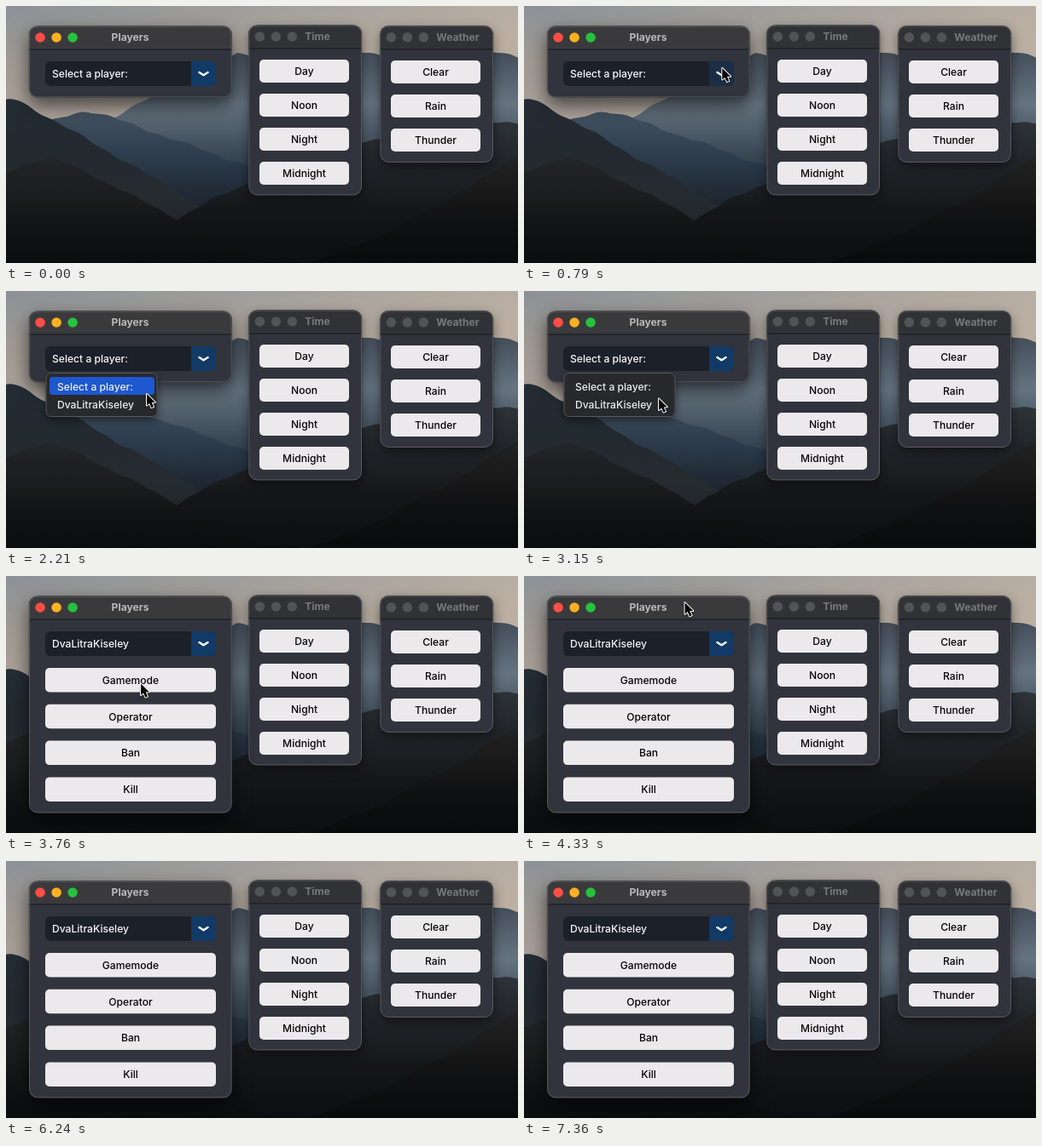
Animation, 600 px wide and 302 px high, one loop 7.39 s. Source, as an HTML page with a canvas:

```html
<!DOCTYPE html>
<html lang="en">
<head>
<meta charset="utf-8">
<title>Control panel</title>
<style>
html, body { margin: 0; width: 100%; height: 100%; overflow: hidden; background: #14171c; }
canvas { display: block; width: 600px; height: 302px; }
</style>
</head>
<body>
<canvas id="stage"></canvas>
<script>
const W = 600, H = 302, LOOP = 7390;
const FONT = 'Inter, "Open Sans", sans-serif';
const PROMPT = 'Select a player:', PLAYER = 'DvaLitraKiseley';
const PRESS = 640, OPEN = 940, LEAVE = 1500, PICK = 3110, CHOSEN = 3300, CLOSED = 3400;

const canvas = document.getElementById('stage');
const dpr = window.devicePixelRatio || 1;
canvas.width = W * dpr;
canvas.height = H * dpr;
const ctx = canvas.getContext('2d');

function box(x, y, w, h, r, fill) {
  ctx.beginPath();
  ctx.roundRect(x, y, w, h, r);
  ctx.fillStyle = fill;
  ctx.fill();
}

function outline(x, y, w, h, r, color) {
  ctx.beginPath();
  ctx.roundRect(x, y, w, h, r);
  ctx.lineWidth = 1;
  ctx.strokeStyle = color;
  ctx.stroke();
}

function shadowed(alpha, blur, dy, paint) {
  ctx.save();
  ctx.shadowColor = `rgba(0,0,0,${alpha})`;
  ctx.shadowBlur = blur * dpr;
  ctx.shadowOffsetY = dy * dpr;
  paint();
  ctx.restore();
}

function text(str, x, y, color, align = 'center', weight = 500, size = 12.1) {
  ctx.font = `${weight} ${size}px ${FONT}`;
  ctx.textAlign = align;
  ctx.fillStyle = color;
  ctx.fillText(str, x, y + 4.5);
}

function shade(c, x0, y0, x1, y1, colors) {
  const g = c.createLinearGradient(x0, y0, x1, y1);
  colors.forEach((col, i) => g.addColorStop(i / (colors.length - 1), col));
  return g;
}

// Fills everything below the height function, with a slightly rough edge
function ridge(c, top, bottom, colors, height) {
  c.beginPath();
  c.moveTo(0, H);
  for (let x = 0; x <= W; x += 3) {
    c.lineTo(x, height(x) + Math.sin(x / 5) * .8 + Math.sin(x / 13 + top) * 1.2);
  }
  c.lineTo(W, H);
  c.fillStyle = shade(c, 0, top, 0, bottom, colors);
  c.fill();
}

function makeLandscape() {
  const layer = document.createElement('canvas');
  layer.width = canvas.width;
  layer.height = canvas.height;
  const c = layer.getContext('2d');
  c.scale(dpr, dpr);
  c.fillStyle = shade(c, 0, 0, 0, 120, ['#8b9197', '#a09a94', '#a9a098']);
  c.fillRect(0, 0, W, H);
  c.fillStyle = shade(c, 0, 0, W, 0, ['rgba(198,183,166,0)', 'rgba(198,183,166,.75)']);
  c.fillRect(0, 0, W, H);

  ridge(c, 55, 235, ['#454f5b', '#667481', '#3a4855', '#1b2128'],
    x => Math.max(60 + 5 * Math.sin(x / 24), 196 - .52 * x));
  ridge(c, 120, 270, ['#465563', '#2f3f50', '#202a35', '#15191e'],
    x => 120 + .36 * Math.hypot(x - 95, 10));
  ridge(c, 105, 215, ['#262e36', '#22292f', '#262b30'],
    x => 105 + .58 * Math.hypot(x - 6, 8));
  ridge(c, 137, 290, ['#2e3338', '#202428', '#15181b', '#101215'],
    x => 137 + 125 * ((W - x) / 420) ** 2);
  ridge(c, 175, 290, ['#232628', '#191b1d', '#0e1012'],
    x => 170 + .52 * Math.hypot(x - 48, 18));
  ridge(c, 175, 300, ['#232324', '#151516', '#0a0b0c'],
    x => 301 - 125 * (Math.max(0, x - 350) / 250) ** 1.3);
  c.fillStyle = shade(c, 0, 225, 0, H, ['rgba(8,10,12,0)', 'rgba(8,10,12,.4)']);
  c.fillRect(0, 225, W, H - 225);
  return layer;
}
const landscape = makeLandscape();

function panel(x, y, w, h, title, titleX, lights, active) {
  const [alpha, blur, dy] = active ? [.6, 22, 9] : [.45, 14, 5];
  shadowed(alpha, blur, dy, () => box(x, y, w, h, 10, '#31343c'));
  box(x, y, w, 27, [10, 10, 0, 0], active ? '#3a3a3c' : '#313236');
  ctx.fillStyle = '#17181b';
  ctx.fillRect(x, y + 27, w, 1);
  outline(x, y, w, h, 10, 'rgba(0,0,0,.3)');
  outline(x + .5, y + .5, w - 1, h - 1, 9.5, 'rgba(255,255,255,.22)');
  lights.forEach((color, i) => box(x + 7.3 + 19 * i, y + 7.7, 11.6, 11.6, 5.8, color));
  text(title, titleX, y + 13.2, active ? '#b9b9ba' : '#77787b', 'center', 700);
}

function buttons(x, y, w, h, step, labels) {
  labels.forEach((label, i) => {
    box(x, y + i * step, w, h, 5, '#ebe9ec');
    text(label, x + w / 2, y + i * step + h / 2, '#050505');
  });
}

function combo(value, hover) {
  box(46, 65, 200, 29, 6, '#1b2029');
  box(217, 65, 29, 29, [0, 6, 6, 0], hover ? '#1a2e46' : '#123a67');
  text(value, 54, 79.7, '#f7f7f8', 'left');
  ctx.beginPath();
  ctx.moveTo(226.5, 78);
  ctx.lineTo(231.5, 81.3);
  ctx.lineTo(236.5, 78);
  ctx.strokeStyle = '#fff';
  ctx.lineWidth = 2.5;
  ctx.lineCap = ctx.lineJoin = 'round';
  ctx.stroke();
}

function menu(selected, alpha) {
  ctx.save();
  ctx.globalAlpha = alpha;
  shadowed(.45, 10, 4, () => box(46.5, 96, 131, 52, 6, '#27292d'));
  outline(47, 96.5, 130, 51, 5.5, '#55575b');
  if (selected >= 0) box(51, 101 + 21 * selected, 123, 21, 4, '#1d58cf');
  [PROMPT, PLAYER].forEach((s, i) => text(s, 60, 112 + 21 * i, '#ededee', 'left'));
  ctx.restore();
}

// Pointer moves: start, end, destination
const ENTRY = [612, 55];
const moves = [
  [30, 450, [232.3, 73]],
  [LEAVE, 2100, [165, 121]],
  [2300, 2600, [158, 126.5]],
  [4000, 4550, [205, -20]]
];

function pointerAt(t) {
  let pos = ENTRY;
  for (const [from, to, dest] of moves) {
    const u = Math.min(1, Math.max(0, (t - from) / (to - from)));
    const k = u * u * (3 - 2 * u);
    pos = pos.map((v, i) => v + (dest[i] - v) * k);
  }
  return pos;
}

function arrow(x, y) {
  ctx.save();
  ctx.translate(x, y);
  const shape = new Path2D('M0 0V13.6L3.1 10.9 5.5 16.2 8 15.1 5.7 9.9 9.8 9.7Z');
  ctx.lineJoin = 'round';
  ctx.lineWidth = 2;
  ctx.strokeStyle = '#fff';
  shadowed(.4, 2, 1, () => ctx.stroke(shape));
  ctx.fillStyle = '#000';
  ctx.fill(shape);
  ctx.restore();
}

function draw(t) {
  ctx.setTransform(dpr, 0, 0, dpr, 0, 0);
  ctx.drawImage(landscape, 0, 0, W, H);
  const grey = Array(3).fill('#525357');
  const chosen = t >= CHOSEN;
  const [px, py] = pointerAt(t);

  panel(284.3, 22.5, 132.7, 200, 'Time', 365, grey, false);
  buttons(297, 63, 105, 27, 40, ['Day', 'Noon', 'Night', 'Midnight']);
  panel(438.3, 23.3, 132.7, 160.7, 'Weather', 529.5, grey, false);
  buttons(451, 64, 105, 27, 40, ['Clear', 'Rain', 'Thunder']);
  panel(27, 23.5, 237.7, chosen ? 255 : 84, 'Players', 145.5, ['#fe4d46', '#fdb022', '#27c03f'], true);
  combo(chosen ? PLAYER : PROMPT, t >= PRESS && t < LEAVE + 140);
  if (chosen) buttons(46, 108, 200, 28.5, 42.8, ['Gamemode', 'Operator', 'Ban', 'Kill']);

  if (t >= OPEN && t < CLOSED) {
    const inside = px < 178 && py > 101;
    const blink = t >= PICK && t < PICK + 70;
    const selected = !inside || blink ? -1 : py < 122 ? 0 : 1;
    menu(selected, Math.min(1, (CLOSED - t) / 160));
  }
  arrow(px, py);
}

const start = performance.now();
function tick(now) {
  draw(Math.max(0, now - start) % LOOP);
  requestAnimationFrame(tick);
}
draw(0);
requestAnimationFrame(tick);
</script>
</body>
</html>
```
